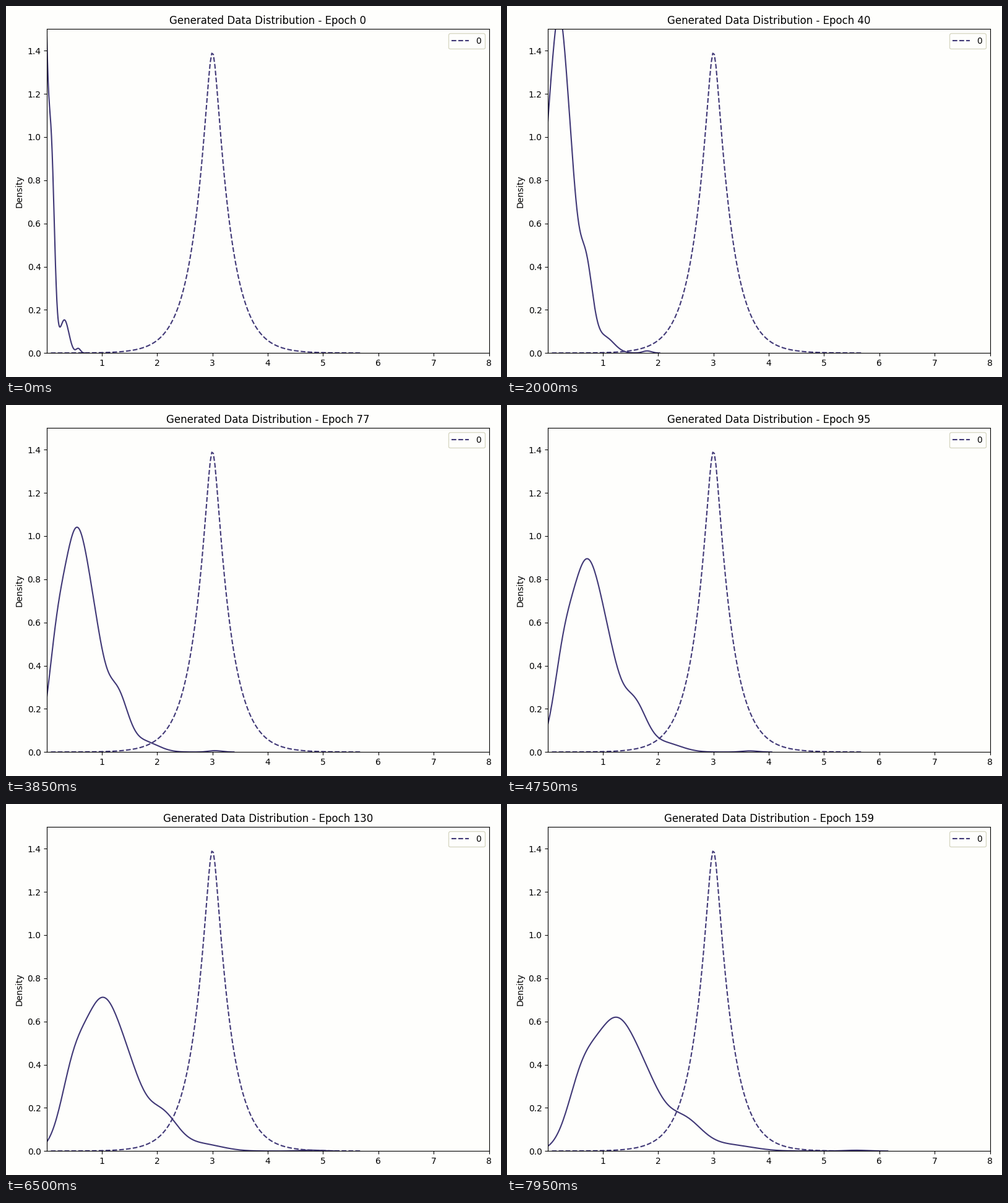
Recreate the animation shown at these times as a matplotlib script. Size 800x600 px, loop 8 s.

```python
import numpy as np
import matplotlib.pyplot as plt
from matplotlib.animation import FuncAnimation

EPOCHS, STEP_MS = 160, 50
PAPER, INK, FRAME = "#fefefc", "#403876", "#d8d8c4"

plt.rcParams.update({
    "font.family": "DejaVu Sans", "font.size": 10,
    "figure.facecolor": PAPER, "axes.facecolor": PAPER,
})


def bell(u, height, centre, width):
    return height * np.exp(-0.5 * ((u - centre) / width) ** 2)


def real_density(x):
    """Two-sided exponential around 3 with a rounded tip."""
    return 1.77 * np.exp(-3.4 * np.hypot(x - 3, 0.0706))


def generated_density(epoch):
    """A sum of bells that stretches with the epoch and flattens as it does."""
    p = epoch / (EPOCHS - 1)
    young = 1 - p
    scale = 0.3 + 1.232 * p + 0.399 * p**2 - 0.326 * p**3
    bump = 3.76 - 0.3 * young**2
    u = np.linspace(-0.2, bump + 0.36, 300)
    shape = (bell(u, 0.97, 1.06, 0.27)                            # main peak
             + bell(u, 0.32 - 0.14 * young, 0.66, 0.155)          # left flank
             + bell(u, 0.185, 1.45, 0.17)                         # right flank
             + bell(u, 0.225 + 0.05 * young, 1.82, 0.2)           # shoulder
             + bell(u, 0.046, 2.32 + 0.3 * young**6, 0.27)        # tail
             + bell(u, 0.0062, bump, 0.13))                       # far bump
    return u * scale - 0.462, shape / scale


fig, ax = plt.subplots(figsize=(8, 6), dpi=100)
x = np.linspace(0.08, 5.7, 200)
solid, = ax.plot([], [], color=INK, lw=1.5)
dashed, = ax.plot(x, real_density(x), "--", color=INK, lw=1.5, label="0")
ax.set_xlim(0.01, 8)
ax.set_ylim(0, 1.5)
ax.set_ylabel("Density")
title = ax.set_title("Generated Data Distribution - Epoch 0")
ax.legend(handles=[dashed], loc="upper right", facecolor=PAPER,
          edgecolor=FRAME, framealpha=1)
for _ in range(2):  # the second pass settles the margins
    fig.tight_layout()


def draw(epoch):
    solid.set_data(*generated_density(epoch))
    title.set_text(f"Generated Data Distribution - Epoch {epoch}")
    return solid, title


anim = FuncAnimation(fig, draw, frames=EPOCHS, interval=STEP_MS,
                     repeat=True, repeat_delay=0, blit=False)
plt.show()
```
